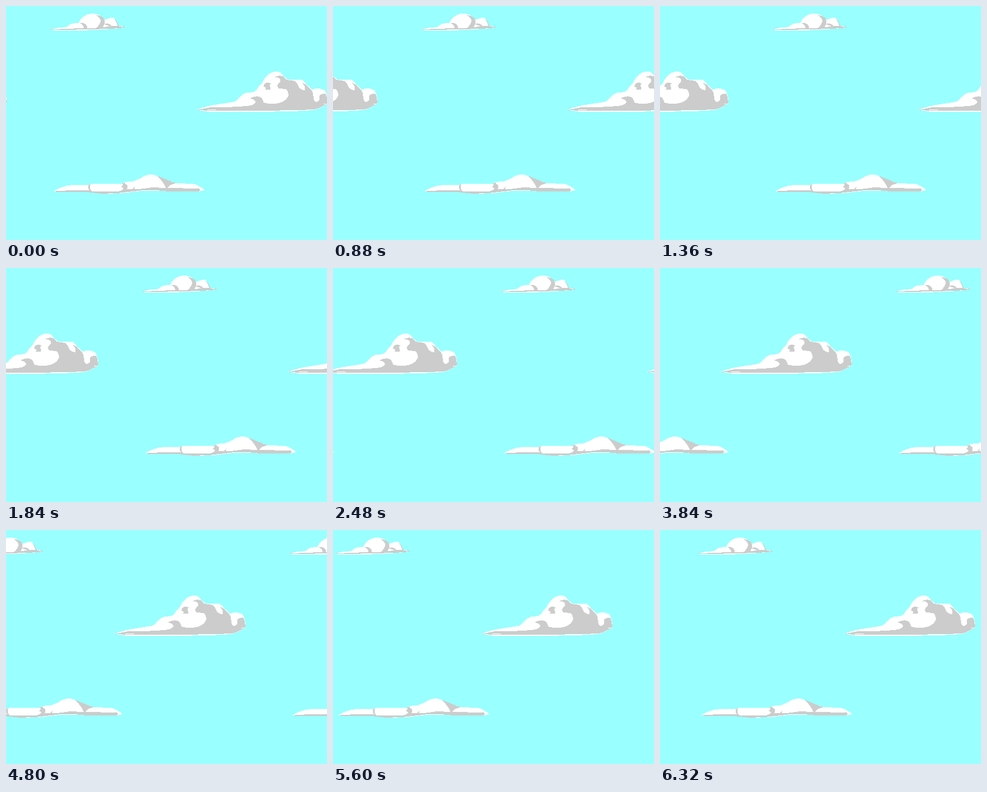
An HTML page for the animation above (6400 ms loop, 550 px wide and 400 px high).

```html
<!DOCTYPE html>
<html lang="en">
<head>
<meta charset="utf-8">
<title>Drifting clouds</title>
<style>
  html, body { margin: 0; width: 100%; height: 100%; overflow: hidden; background: #9ff; }
  svg { display: block; }
  .lit { fill: #fff; }
  .shade { fill: #ccc; }
  .drift { animation: drift 6400ms steps(80, end) infinite; }
  @keyframes drift {
    from { transform: translateX(0); }
    to { transform: translateX(545.6px); }
  }
</style>
</head>
<body>
<svg width="550" height="400" viewBox="0 0 550 400" shape-rendering="crispEdges">
  <defs>
    <g id="clouds">
      <!-- small, top -->
      <path class="lit" d="M76 40.5 L88 37.5 L104 36 Q109 30 117 29.5 L125 29 Q126 22 133 18 Q139 13 148 13 L158 14 Q161 18 166 19 L169 24 Q175 21 179 20 Q184 19 187 22 Q187 25 190 27 Q191 32 194 34 L200 35.5 L206 37 L190 38.5 L160 40.5 L130 42 L80 42Z"/>
      <path class="shade" d="M77 40.5 L100 39 L133 38 Q133 32 126 29 Q134 28 137 32 Q140 36 139 38.5 L154 38 Q162 31 162 25 Q161 19 154 16 Q164 16 168 22 Q171 29 166 36 L178 35 Q174 32 169 32 L170 30 Q177 29 181 34 L191 34 Q190 28 186 23 L190 27 L193 34 L198 36 L201 35 L205 37 L180 39 L160 39.5 L100 41Z"/>
      <!-- large, right -->
      <path class="lit" d="M326 177.5 Q346 170 364 168 L389 164 Q395 163 399 157 Q407 148 415 148 L424 147 Q430 144 433 137 Q440 132 441 127 Q447 116 457 113 Q468 110 473 116 Q476 122 484 126 L507 126 Q513 130 515 135 Q521 138 524 143 Q535 139 544 143 Q549 147 549 151 Q552 158 551 167 Q540 174 528 178 L500 179.5 L440 181 L345 180.5Z"/>
      <path class="shade" d="M328 177.5 L348 173.5 L380 173 L413 171 Q424 170 428 165 Q427 160 418 158 Q427 153 434 155 Q441 158 441 165 Q454 169 467 166 Q480 163 484 153 Q484 147 480 142 L467 141 Q464 138 466 133 Q471 131 470 126 Q467 121 460 122 Q468 117 476 121 L480 126 L495 128 Q500 133 502 139 Q506 144 512 144 Q514 139 508 132 Q516 134 518 139 Q525 143 526 150 L527 158 Q528 164 532 164 Q538 163 537 156 Q535 150 548 150 L550 156 L551 166 Q540 174 528 177 L500 178 L440 179 L345 179Z"/>
      <path class="shade" d="M441 138 Q443 131 448 131 L454 132 Q450 136 453 139 L453 143 L444 143 Q448 139 441 138Z"/>
      <path class="lit" d="M345 177 H360 V178 H345Z M544 167 H548 V168 H544Z"/>
      <!-- long, bottom -->
      <path class="lit" d="M82 316 Q93 310 103 307.5 Q116 305 141 306 L146 304 L198 304 Q203 300 218 299.5 Q228 296 234 292 Q245 286 255 289 L291 303 L322 304 Q333 308 341 315 L330 317 L278 317 Q245 314 225 317 L200 320 L165 321 L138 318 L86 317.5Z"/>
      <path class="shade" d="M84 316 L138 314.5 L143 315 Q140 312 141 306 L145 305 Q141 312 148 317 L194 316.5 Q201 315 201 311 L197 309 Q202 306 199 303 L205 302 Q202 304 207 305 Q210 309 207 313 L216 313 L221 309 Q219 313 222 313.5 Q238 312 250 310 L274 311 Q270 300 258 290 Q275 297 291 303 Q281 305 276 311 L329 312 L324 307 L333 314 L331 317 L278 317 Q245 313 226 316 L195 319.5 L165 321 L138 318 L86 317.5Z"/>
    </g>
  </defs>
  <g class="drift">
    <use href="#clouds"/>
    <use href="#clouds" x="-550"/>
  </g>
</svg>
</body>
</html>
```
